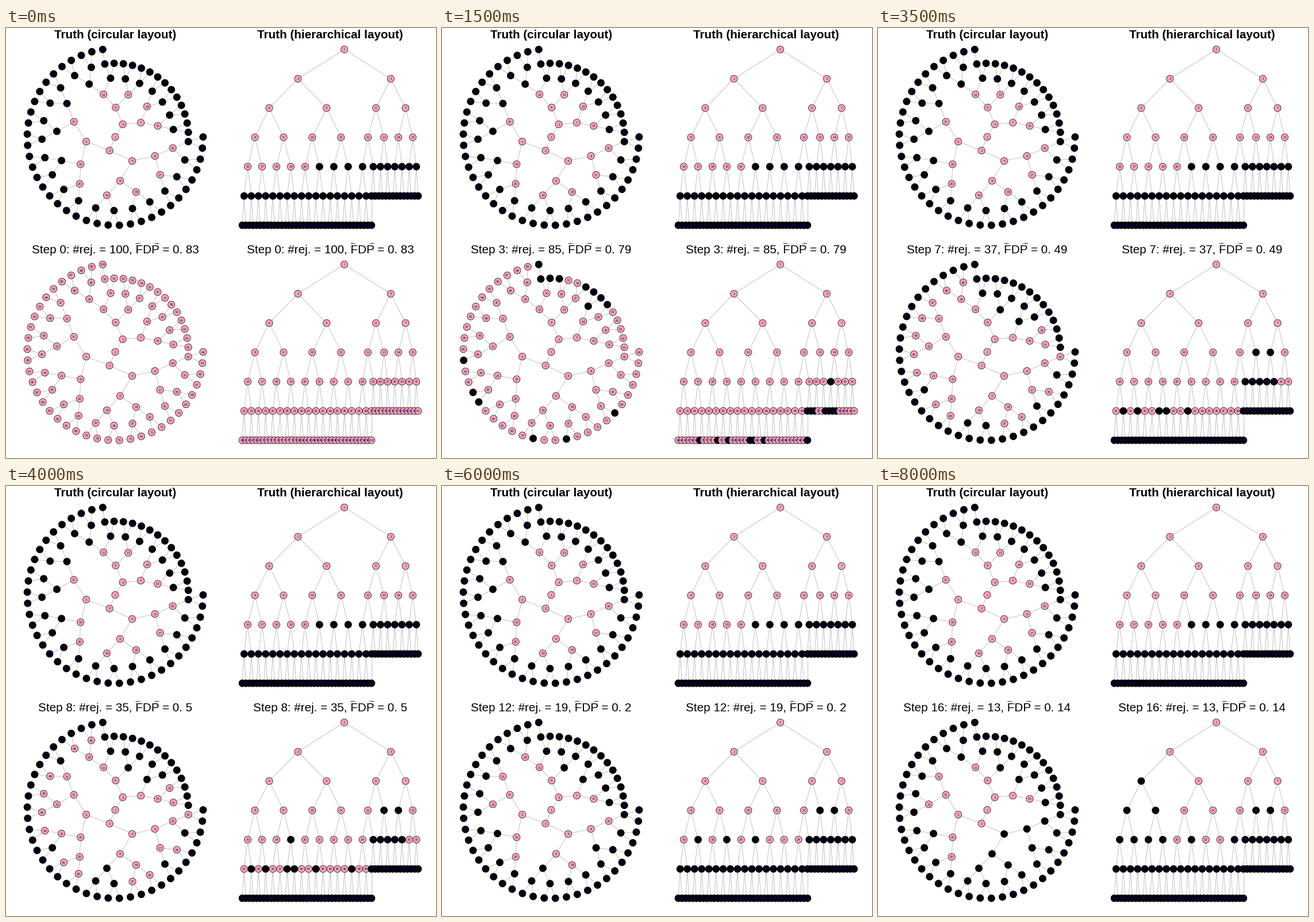
Animation of 748x748 px, one loop 8.5 s. Source, as a matplotlib script:

```python
import numpy as np
import matplotlib.pyplot as plt
from matplotlib.animation import FuncAnimation
from matplotlib.collections import EllipseCollection, LineCollection
from matplotlib.patches import Rectangle
from matplotlib.textpath import TextPath

STAGE = 748
HALF = STAGE / 2
DPI = 100
PT = 72 / DPI  # points per pixel
NODES = 100
NULLS_FROM = 21
RADIUS = 6.1
TITLE_PX = 20.7
LABEL_PX = 6.6
PINK, BLACK = "#ffa2b5", "#000000"
SANS = "Liberation Sans"

# Nodes dropped on entering each step; a pair (a, b) means a..b inclusive.
DROPS = [
    [],
    [84, 85, 75, 100, 56],
    [50, 51, 57, 70, 78],
    [52, 55, 28, 58, 88],
    [(64, 99), 42, 53, 54, (59, 63)],
    [38, 33, 25, 26, 27],
    [35, 29, 13],
    [39, 14],
    [47, 19],
    [43, 44],
    [34, 21],
    [17, 30, 41, 45, 46, 48],
    [31, 32, 36, 37, 40, 49],
    [18, 16],
    [9, 8],
    [4],
    [24],
]
FDP = ["83", "82", "81", "79", "49", "47", "48", "49", "5", "52",
       "5", "35", "2", "19", "17", "15", "14"]


def rejected_sets():
    alive = set(range(1, NODES + 1))
    steps = []
    for drop in DROPS:
        for item in drop:
            lo, hi = item if isinstance(item, tuple) else (item, item)
            alive -= set(range(lo, hi + 1))
        steps.append(frozenset(alive))
    return steps


def tidy_x(i):
    """Horizontal slot of node i: leaves are evenly spaced, parents centred."""
    if i >= 64:
        return i - 64
    if i >= 50:
        return i - 14
    return (tidy_x(2 * i) + tidy_x(2 * i + 1)) / 2


def fit(v, mid, half=152.9):
    """Rescale values so that they span mid - half .. mid + half."""
    return mid + half * (2 * (v - v.min()) / (v.max() - v.min()) - 1)


def layouts():
    ids = range(1, NODES + 1)
    slot = np.array([tidy_x(i) for i in ids])
    depth = np.array([i.bit_length() - 1 for i in ids])
    angle = slot / slot.max() * 2 * np.pi * (NODES - 1) / NODES
    circle = depth * np.cos(angle), depth * np.sin(angle)
    return [np.column_stack([fit(x, 190), fit(y, 190.2)])
            for x, y in (circle, (slot, depth))]


def colours(pink_ids):
    return [PINK if i in pink_ids else BLACK for i in range(1, NODES + 1)]


def draw_tree(ax, pos):
    edges = [(pos[i // 2 - 1], pos[i - 1]) for i in range(2, NODES + 1)]
    ax.add_collection(LineCollection(
        edges, colors="#a9a9a9", linewidths=0.7 * PT, zorder=1))
    size = np.full(NODES, 2 * RADIUS)
    dots = EllipseCollection(
        size, size, np.zeros(NODES), units="xy", offsets=pos,
        offset_transform=ax.transData, edgecolors="black",
        linewidths=0.7 * PT, zorder=2)
    ax.add_collection(dots)
    for i, (x, y) in enumerate(pos, 1):
        ax.text(x, y + 0.33 * LABEL_PX, str(i), ha="center", va="baseline",
                family="Liberation Serif", size=LABEL_PX * PT,
                color="darkblue", zorder=3)
    return dots


def draw_title(ax, x, y, text="", weight="normal"):
    return ax.text(x, y, text, ha="center", va="baseline", family=SANS,
                   size=TITLE_PX * PT, weight=weight, zorder=4)


def text_width(text):
    path = TextPath((0, 0), text, size=TITLE_PX, prop={"family": SANS})
    return path.get_extents().x1


fig = plt.figure(figsize=(STAGE / DPI, STAGE / DPI), dpi=DPI, facecolor="white")
ax = fig.add_axes([0, 0, 1, 1])
ax.set(xlim=(0, STAGE), ylim=(STAGE, 0))
ax.axis("off")

REJECTED = rejected_sets()
lower, titles, hats = [], [], []
names = ["Truth (circular layout)", "Truth (hierarchical layout)"]
for col, (pos, name) in enumerate(zip(layouts(), names)):
    dx = col * HALF
    upper = draw_tree(ax, pos + [dx, 0])
    upper.set_facecolor(colours(range(1, NULLS_FROM)))
    lower.append(draw_tree(ax, pos + [dx, HALF]))
    draw_title(ax, 190 + dx, 18, name, "bold")
    titles.append(draw_title(ax, 190 + dx, HALF + 18))
    # The wide hat over FDP is cut off by the top of the lower panel.
    hat, = ax.plot([], [], color="black", lw=0.9 * PT, zorder=4)
    hat.set_clip_path(Rectangle((0, HALF), STAGE, HALF,
                                transform=ax.transData))
    hats.append(hat)


def update(step):
    alive = REJECTED[step]
    prefix = f"Step {step}: #rej. = {len(alive)}, FDP"
    text = f"{prefix} = 0. {FDP[step]}"
    right = text_width(prefix) - text_width(text) / 2
    left = right - text_width("FDP")
    for col in range(2):
        mid = 190 + col * HALF
        lower[col].set_facecolor(colours(alive))
        titles[col].set_text(text)
        hats[col].set_data(
            [mid + left, mid + (left + right) / 2, mid + right],
            [HALF + 1, HALF - 1.8, HALF + 1])
    return lower + titles + hats


anim = FuncAnimation(fig, update, frames=len(DROPS), interval=500,
                     repeat=True, repeat_delay=0, blit=False)
plt.show()
```
